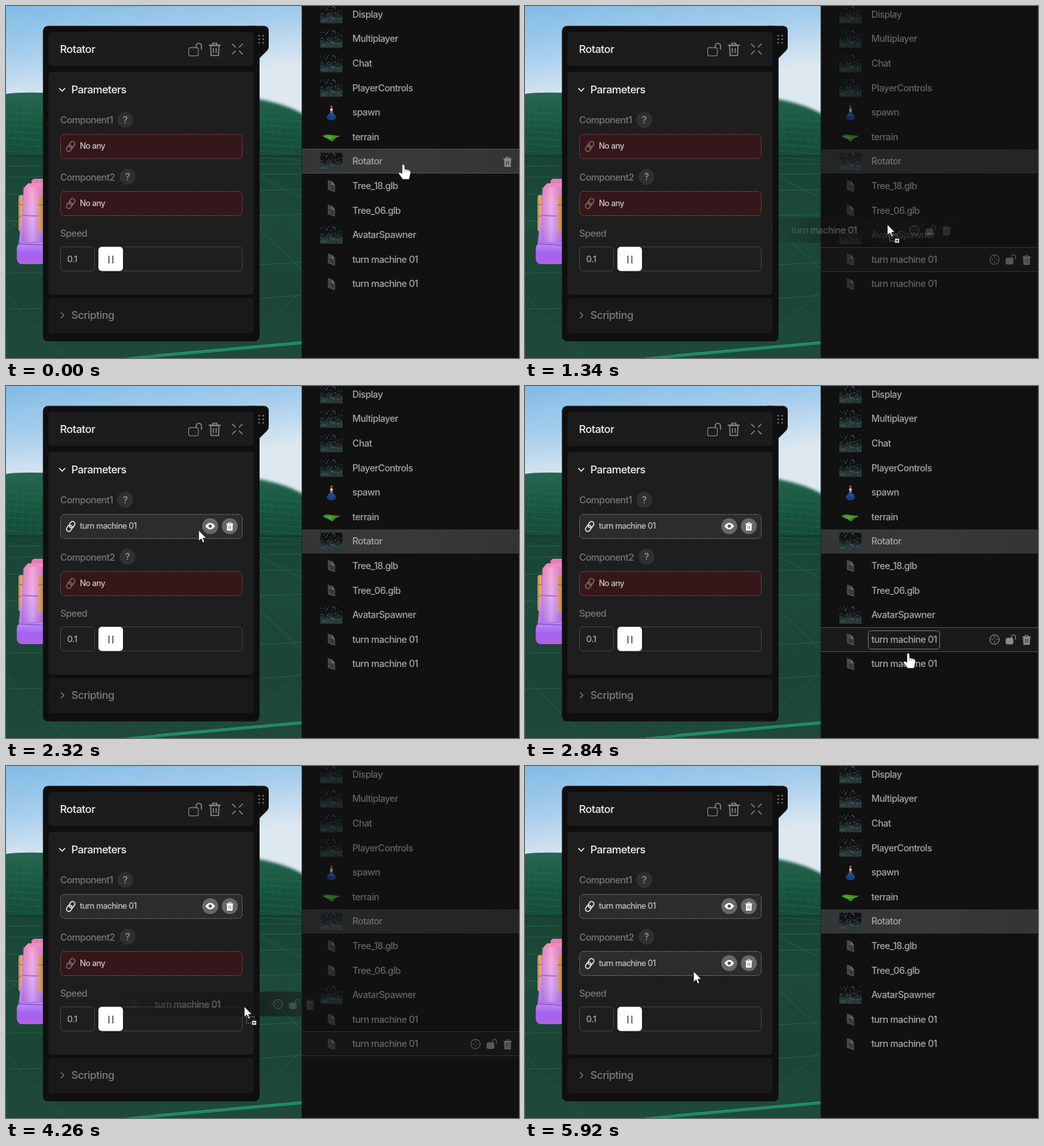
An HTML page with a canvas that plays this animation: 785 px wide and 540 px high, repeating every 5940 ms.

```html
<!DOCTYPE html>
<html lang="en">
<head>
<meta charset="utf-8">
<title>Rotator</title>
<style>
html, body { margin: 0; width: 100%; height: 100%; overflow: hidden; background: #111; }
canvas { display: block; width: 785px; height: 540px; }
</style>
</head>
<body>
<canvas id="stage"></canvas>
<script>
const W = 785, H = 540, LOOP = 5940, PITCH = 37.6, LIST_X = 453;
const canvas = document.getElementById('stage');
const scale = window.devicePixelRatio || 1;
let g = canvas.getContext('2d');

const ROWS = [
  ['Display', 'scene'], ['Multiplayer', 'scene'], ['Chat', 'scene'], ['PlayerControls', 'scene'],
  ['spawn', 'spawn'], ['terrain', 'leaf'], ['Rotator', 'scene'], ['Tree_18.glb', 'file'],
  ['Tree_06.glb', 'file'], ['AvatarSpawner', 'scene'],
  ['turn machine 01', 'file'], ['turn machine 01', 'file']
];
const rowY = i => 13 + i * PITCH;
const rowTop = i => Math.floor(rowY(i) - 18.9);

// Cursor tip: time, x, y
const PATH = [
  [0, 608, 243], [300, 648, 300], [540, 681, 379], [600, 680, 381], [680, 677, 380],
  [1080, 677, 380], [1300, 580, 345], [1560, 398, 270], [1800, 325, 236], [2060, 286, 214],
  [2200, 284, 213], [2280, 286, 215], [2560, 460, 330], [2840, 586, 410], [3060, 640, 426],
  [3280, 664, 430], [3500, 664, 430], [3660, 667, 430], [3960, 667, 430], [4260, 365, 369],
  [4540, 305, 346], [4940, 263, 319], [5080, 261, 317], [5300, 261, 317], [5680, 258, 315],
  [LOOP, 258, 315]
];
const DRAGS = [
  { from: 1080, to: 2180, row: 10, x: 677, y: 380 },
  { from: 3960, to: 5320, row: 11, x: 667, y: 430 }
];

function slope(i, k) {
  const a = PATH[i - 1], b = PATH[i], c = PATH[i + 1];
  if (!a || !c) return 0;
  const l = (b[k] - a[k]) / (b[0] - a[0]), r = (c[k] - b[k]) / (c[0] - b[0]);
  return l * r <= 0 ? 0 : 2 * l * r / (l + r);
}

function cursorAt(t) {
  let i = 0;
  while (i < PATH.length - 2 && t >= PATH[i + 1][0]) i++;
  const a = PATH[i], b = PATH[i + 1], d = b[0] - a[0], u = (t - a[0]) / d, v = 1 - u;
  const at = k => a[k] * (1 + 2 * u) * v * v + slope(i, k) * d * u * v * v +
    b[k] * u * u * (3 - 2 * u) - slope(i + 1, k) * d * u * u * v;
  return { x: at(1), y: at(2) };
}

function random(seed) {
  return () => (seed = (seed * 16807) % 2147483647) / 2147483647;
}

function box(x, y, w, h, r, fill, stroke, dash = []) {
  g.beginPath();
  g.roundRect(x, y, w, h, r);
  if (fill) { g.fillStyle = fill; g.fill(); }
  if (stroke) {
    g.strokeStyle = stroke;
    g.lineWidth = 1;
    g.setLineDash(dash);
    g.stroke();
    g.setLineDash([]);
  }
}

function disc(x, y, r, fill) {
  g.beginPath();
  g.arc(x, y, r, 0, 7);
  g.fillStyle = fill;
  g.fill();
}

function poly(points, fill, stroke, width = 1, closed = true) {
  g.beginPath();
  for (let i = 0; i < points.length; i += 2) g.lineTo(points[i], points[i + 1]);
  if (closed) g.closePath();
  if (fill) { g.fillStyle = fill; g.fill(); }
  if (stroke) { g.strokeStyle = stroke; g.lineWidth = width; g.stroke(); }
}

const line = (points, color, width = 1) => poly(points, null, color, width, false);

function text(s, x, y, size, color, align = 'left') {
  g.font = `500 ${size}px Inter, sans-serif`;
  g.letterSpacing = '-0.5px';
  g.textAlign = align;
  g.textBaseline = 'alphabetic';
  g.fillStyle = color;
  g.fillText(s, x, y + size * 0.355);
}

function fade(x0, y0, x1, y1, ...colors) {
  const f = g.createLinearGradient(x0, y0, x1, y1);
  colors.forEach((c, i) => f.addColorStop(i / (colors.length - 1), c));
  return f;
}

function place(x, y, draw) {
  g.save();
  g.translate(x, y);
  draw();
  g.restore();
}

// Icons
function trash(x, y, s, color, solid) {
  place(x, y, () => {
    g.scale(s, s);
    g.lineJoin = g.lineCap = 'round';
    line([-8, -6, 8, -6], color, 1.6);
    line([-3, -6.5, -3, -9, 3, -9, 3, -6.5], color, 1.5);
    poly([-6, -5.5, 6, -5.5, 5.5, 9, -5.5, 9], solid && color, color, 1.5);
    const bar = solid || color;
    line([-2, -1.5, -2, 5], bar, 1.4);
    line([2, -1.5, 2, 5], bar, 1.4);
  });
}

function lock(x, y, s, color, solid) {
  place(x, y, () => {
    g.scale(s, s);
    box(-9, -3, 14, 12, 2.5, solid && color, color);
    g.lineWidth = 1.5;
    g.beginPath();
    g.moveTo(2, -3);
    g.lineTo(2, -5.5);
    g.arc(5.8, -5.5, 3.8, Math.PI, 0);
    g.lineTo(9.6, 0);
    g.stroke();
  });
}

function target(x, y, color) {
  g.beginPath();
  g.arc(x, y, 7.2, 0, 7);
  g.strokeStyle = color;
  g.lineWidth = 1.2;
  g.stroke();
  for (const [dx, dy] of [[1, 0], [-1, 0], [0, 1], [0, -1]])
    line([x + dx * 2, y + dy * 2, x + dx * 5, y + dy * 5], color, 1.2);
}

function chain(x, y, color) {
  place(x, y, () => {
    g.rotate(-0.95);
    g.strokeStyle = color;
    g.lineWidth = 1.7;
    for (const dx of [-8.5, -1.5]) {
      g.beginPath();
      g.roundRect(dx, -3.6, 10, 7.2, 3.6);
      g.stroke();
    }
  });
}

function eye(x, y) {
  g.beginPath();
  g.moveTo(x - 7.5, y);
  g.quadraticCurveTo(x, y - 10, x + 7.5, y);
  g.quadraticCurveTo(x, y + 10, x - 7.5, y);
  g.fillStyle = '#fff';
  g.fill();
  disc(x, y, 2.5, '#555');
}

function thumb(x, y) {
  const next = random(77);
  g.fillStyle = fade(0, y, 0, y + 27, '#0c0e0f', '#0f1112', '#15191a', '#25393b', '#2c3435');
  g.fillRect(x, y, 34, 27);
  for (let i = 0; i < 46; i++) {
    g.fillStyle = `rgba(215,222,222,${0.15 + next() * 0.55})`;
    g.fillRect(x + next() * 33, y + next() * 18, 1, 1);
  }
  for (let i = 0; i < 24; i++) {
    g.fillStyle = `rgba(125,170,172,${next() * 0.5})`;
    g.fillRect(x + next() * 32, y + 18 + next() * 7, 2, 1);
  }
}

function rowIcon(kind, y) {
  if (kind === 'scene') thumb(481, y - 13.5);
  if (kind === 'file') place(498, y, () => {
    g.transform(1, 0.35, 0, 1, 0, 0);
    poly([-5.5, -7.5, 1, -7.5, 5.5, -3, 5.5, 7.5, -5.5, 7.5], '#4b4b4c');
    poly([1, -7.5, 1, -3, 5.5, -3], '#777');
    g.fillStyle = '#242424';
    g.fillRect(-3.5, 0, 7, 1.5);
    g.fillRect(-2, 3, 6, 1.5);
  });
  if (kind === 'spawn') {
    g.beginPath();
    g.ellipse(498, y + 7, 7, 5, 0, 0, 7);
    g.fillStyle = '#173f86';
    g.fill();
    poly([495, y, 501, y, 503, y + 6, 493, y + 6], '#234a8c');
    box(496, y - 7, 4, 7, 2, '#c9d0d8');
    disc(498, y - 9, 2, '#a3453a');
    g.fillStyle = '#c43b39';
    g.fillRect(496, y - 3, 4, 2);
  }
  if (kind === 'leaf') {
    poly([484, y - 2, 491, y - 4, 498, y - 3, 512, y - 2, 504, y + 2, 499, y + 7, 493, y + 3, 488, y + 1],
      fade(483, y - 4, 508, y + 5, '#2c7a1c', '#48a02c', '#1d6016'));
    line([487, y - 1, 499, y + 1, 509, y - 1], '#6cbb4c', 0.8);
  }
}

function rowTools(kind, y, color) {
  trash(767.5, y + 0.5, 0.78, color, '#222');
  if (kind !== 'file') return;
  target(718.5, y, color);
  lock(743, y, 0.78, color, true);
}

function drawRow(i, hover, boxed) {
  const [name, kind] = ROWS[i], y = rowY(i), top = rowTop(i);
  if (i === 6 || hover) {
    g.fillStyle = i === 6 ? fade(LIST_X, 0, W, 0, '#343536', '#383939', '#333435') : '#1a1a1a';
    g.fillRect(LIST_X, top + 1, W - LIST_X, 37);
  }
  if (hover) {
    const edge = i === 6 ? '#584d46' : '#4c4c4d';
    line([LIST_X, top + 0.5, W, top + 0.5], edge);
    line([LIST_X, top + 37.5, W, top + 37.5], edge);
    rowTools(kind, y, '#8c8c8c');
  }
  rowIcon(kind, y);
  text(name, 530, y - 0.3, 14.2, '#a6a6a6');
  if (boxed) box(525.5, y - 13.5, 109, 28, 4, null, '#777');
}

function drawList(hover, boxed, dim) {
  g.fillStyle = '#111112';
  g.fillRect(LIST_X - 0.5, 0, W - LIST_X + 0.5, H);
  g.globalAlpha = dim ? 0.55 : 1;
  ROWS.forEach((_, i) => drawRow(i, i === hover, boxed && i === hover));
  g.globalAlpha = 1;
}

function hill(x, y, cx, cy, ex, ey, fill) {
  g.beginPath();
  g.moveTo(x, y);
  g.quadraticCurveTo(cx, cy, ex, ey);
  g.lineTo(ex, 240);
  g.lineTo(x, 240);
  g.fillStyle = fill;
  g.fill();
}

function drawWorld() {
  g.fillStyle = fade(0, 0, 20, 148, '#80bbe6', '#a6cdec', '#dde8f0');
  g.fillRect(0, 0, LIST_X, 240);
  const slopeFill = fade(0, 132, 0, 236, '#2a6654', '#18573f', '#164a37');
  hill(0, 135, 30, 128, 225, 142, slopeFill);
  g.save();
  g.filter = 'blur(2px)';
  hill(225, 135, 400, 128, LIST_X + 8, 170, slopeFill);
  g.restore();
  g.fillStyle = fade(0, 228, 0, H, '#184436', '#1d4a3a', '#1c4434', '#1f4a39');
  g.fillRect(0, 229, LIST_X, H);

  const faint = 'rgba(52,148,108,.33)', mid = 'rgba(44,150,106,.42)';
  for (let i = 0; i < 7; i++) {
    const y = 162 + i * 10;
    line([0, y, 60, y + 4], faint, 0.8);
    line([385, y + 10, LIST_X, y + 15], faint, 0.8);
    line([i * 13 - 14, 228, i * 9, 150], 'rgba(52,148,108,.2)', 0.8);
    line([388 + i * 13, 228, 383 + i * 10, 165], 'rgba(52,148,108,.2)', 0.8);
  }
  line([0, 230, LIST_X, 230], '#123a2e', 2);
  for (const y of [246, 263, 289, 330, 410, 465])
    line([0, y, 225, y - 4, LIST_X, y - (y - 200) * 0.08], mid, 0.9);
  line([385, 260, LIST_X, 295], faint);
  line([385, 340, LIST_X, 405], mid);
  line([0, 443, 90, 540], faint);
  line([0, 345, 25, 326], faint);
  line([385, 500, LIST_X, 436], faint);
  line([185, 541, LIST_X, 517], '#208766', 4);
  line([230, 535, LIST_X, 515], '#29a176', 1);
}

function drawBackpack() {
  box(19, 290, 9, 56, 4, fade(19, 0, 28, 0, '#b88052', '#e3b07c', '#a9705a'));
  line([20, 304, 27, 306], '#8a5a45');
  line([20, 322, 27, 324], '#8a5a45');
  box(39, 265, 22, 16, 5, '#e57fb6');
  poly([30, 276, 34, 272, 60, 272, 60, 368, 19, 368, 24, 322, 26, 300, 27, 280],
    fade(0, 272, 0, 368, '#f08abc', '#ee94cf', '#dd95e6', '#c288ee', '#ae70e8'));
  box(16.5, 364, 46, 32, 8, fade(0, 364, 0, 396, '#c08cf6', '#a262ef', '#b561e2'));
  g.fillStyle = fade(20, 0, 60, 0, 'rgba(120,40,140,.25)', 'rgba(255,225,255,.32)', 'rgba(120,40,140,.3)');
  g.fillRect(25, 278, 35, 84);
  line([24, 321, 60, 323], '#a061c4', 1.5);
  line([20, 365, 60, 367], '#8850cc', 1.5);
  box(49, 291, 13, 56, 4, fade(49, 0, 60, 0, '#dba36c', '#b57a55'));
  line([50, 305, 58, 305], '#8a5a45');
}

function field(y, state) {
  const fills = { empty: '#351719', over: fade(0, y, 0, y + 37, '#565656', '#6b6b6b'), full: '#2a2c2e' };
  box(83.5, y + 0.5, 278, 37, 6, fills[state], state === 'empty' ? '#8a5553' : '#87898a', [2, 1.5]);
  const full = state === 'full', mid = y + 18.5;
  chain(99, mid + 0.5, full ? '#e0e0e0' : state === 'over' ? '#a0a0a0' : '#7b6666');
  text(full ? 'turn machine 01' : 'No any', 113, mid - 0.3, 12.4, full ? '#c2c2c2' : '#cfc5c5');
  if (!full) return;
  disc(312.5, mid, 12.2, '#666768');
  eye(312.5, mid);
  disc(342.5, mid, 12.2, '#666768');
  trash(342.5, mid + 0.5, 0.66, '#fff', '#666');
}

function label(s, y, helpX) {
  text(s, 83, y, 14.3, '#777');
  if (!helpX) return;
  disc(helpX, y - 0.5, 12.2, '#303031');
  text('?', helpX, y, 14, '#999', 'center');
}

function drawPanel(first, second) {
  box(56.5, 30.5, 331.5, 484, 8, '#0f0f10');
  g.beginPath();
  g.moveTo(370, 30.5);
  g.lineTo(394, 30.5);
  g.quadraticCurveTo(402, 30.5, 402, 38);
  g.lineTo(402, 63);
  g.quadraticCurveTo(402, 66, 399, 69);
  g.lineTo(388, 80);
  g.lineTo(370, 80);
  g.fillStyle = '#0f0f10';
  g.fill();
  for (let i = 0; i < 6; i++) disc(387.5 + (i % 2) * 6, 45.5 + (i >> 1) * 5.5, 1.3, '#777');

  box(65, 40, 314, 52, 5, '#1c1c1d');
  box(65, 101, 314, 342, 5, '#1e1e1f');
  box(65, 448, 314, 54, 5, '#191919');

  text('Rotator', 82.5, 66, 16.5, '#f0f0f0');
  lock(289, 67, 1.05, '#8d8d8d');
  trash(319.5, 66.5, 1.05, '#8d8d8d');
  for (const [dx, dy] of [[1, 1], [1, -1], [-1, 1], [-1, -1]])
    line([354 + dx * 2.5, 66 + dy * 2.5, 354 + dx * 8, 66 + dy * 8], '#8d8d8d', 1.5);

  line([81.5, 126, 86, 130.5, 90.5, 126], '#eee', 1.6);
  text('Parameters', 100, 128, 16.3, '#f0f0f0');
  label('Component1', 175, 182.5);
  field(196.5, first);
  label('Component2', 262.5, 186);
  field(284, second);
  label('Speed', 348.5);

  box(83.5, 369.5, 52, 37, 5, null, '#464646');
  text('0.1', 93.5, 388.5, 13.5, '#aaa');
  box(141.5, 369.5, 220, 37, 5, null, '#464646');
  box(141.5, 369.5, 37.5, 37, 5, '#fff');
  line([157.5, 383, 157.5, 395], '#333', 1.4);
  line([163.5, 383, 163.5, 395], '#333', 1.4);

  line([84, 470, 88.5, 474.5, 84, 479], '#777', 1.5);
  text('Scripting', 100, 474.5, 16.3, '#7c7c7c');
}

// Drag image fades out with distance from the pointer
const ghostCanvas = document.createElement('canvas');
function drawGhost(drag, p) {
  const main = g, w = W - LIST_X, y = rowY(drag.row), top = rowTop(drag.row);
  ghostCanvas.width = w * scale;
  ghostCanvas.height = 38 * scale;
  g = ghostCanvas.getContext('2d');
  g.scale(scale, scale);
  g.translate(-LIST_X, -top);
  g.fillStyle = '#171415';
  g.fillRect(LIST_X, top, w, 38);
  rowIcon('file', y);
  text(ROWS[drag.row][0], 530, y, 14.2, '#a6a6a6');
  rowTools('file', y, '#606060');
  g.globalCompositeOperation = 'destination-in';
  const mask = g.createRadialGradient(drag.x, drag.y, 0, drag.x, drag.y, 190);
  mask.addColorStop(0, 'rgba(0,0,0,.72)');
  mask.addColorStop(0.5, 'rgba(0,0,0,.42)');
  mask.addColorStop(1, 'rgba(0,0,0,0)');
  g.fillStyle = mask;
  g.fillRect(LIST_X, top, w, 38);
  g = main;
  g.drawImage(ghostCanvas, p.x - drag.x + LIST_X, p.y - drag.y + top, w, 38);
}

function arrow(x, y, dragging) {
  place(x, y, () => {
    poly([0, 0, 0, 16.5, 3.8, 13, 6.4, 19, 9, 17.8, 6.5, 12, 11.7, 12], '#fff', '#111', 0.8);
    if (!dragging) return;
    box(3.5, 15.5, 12, 10, 0, null, '#111');
    box(3.5, 15.5, 12, 10, 0, null, '#eee', [1, 2]);
    box(11.5, 21.5, 7, 7, 0, '#fff', '#222');
    line([13, 25, 17, 25], '#111');
    line([15, 23, 15, 27], '#111');
  });
}

function hand(x, y) {
  place(x, y, () => {
    g.beginPath();
    g.moveTo(-2, 1);
    g.quadraticCurveTo(0, -2, 2, 1);
    g.lineTo(2.3, 7);
    g.lineTo(9, 8.5);
    g.quadraticCurveTo(11.5, 9.5, 11.3, 13);
    g.lineTo(9, 23);
    g.lineTo(-1, 23);
    g.lineTo(-7, 14.5);
    g.quadraticCurveTo(-7.5, 11, -4, 12.5);
    g.lineTo(-2, 14);
    g.closePath();
    g.fillStyle = '#fff';
    g.fill();
    g.strokeStyle = '#111';
    g.lineWidth = 0.8;
    g.stroke();
    for (const dx of [2.4, 5.4, 8.4]) line([dx, 8, dx, 11.5], '#777', 0.8);
  });
}

function fieldState(index, t, drag, p) {
  if (t >= DRAGS[index].to) return 'full';
  const top = index ? 284 : 196.5;
  const over = drag && p.x > 83 && p.x < 362 && p.y > top && p.y < top + 38;
  return over ? 'over' : 'empty';
}

function draw(t) {
  const p = cursorAt(t);
  const drag = DRAGS.find(d => t >= d.from && t < d.to);
  const inList = p.x > LIST_X && !drag;
  const hover = drag ? drag.row : inList ? Math.round((p.y - 16) / PITCH) : -1;
  const boxed = inList && hover > 9 && p.x > 525 && p.x < 635;

  g.setTransform(scale, 0, 0, scale, 0, 0);
  drawWorld();
  drawBackpack();
  drawPanel(fieldState(0, t, drag, p), fieldState(1, t, drag, p));
  drawList(hover, boxed, drag);
  if (drag) drawGhost(drag, p);
  if (inList) hand(p.x, p.y);
  else arrow(p.x, p.y, drag);
}

canvas.width = W * scale;
canvas.height = H * scale;
function tick() {
  draw(performance.now() % LOOP);
  requestAnimationFrame(tick);
}
tick();
</script>
</body>
</html>
```
